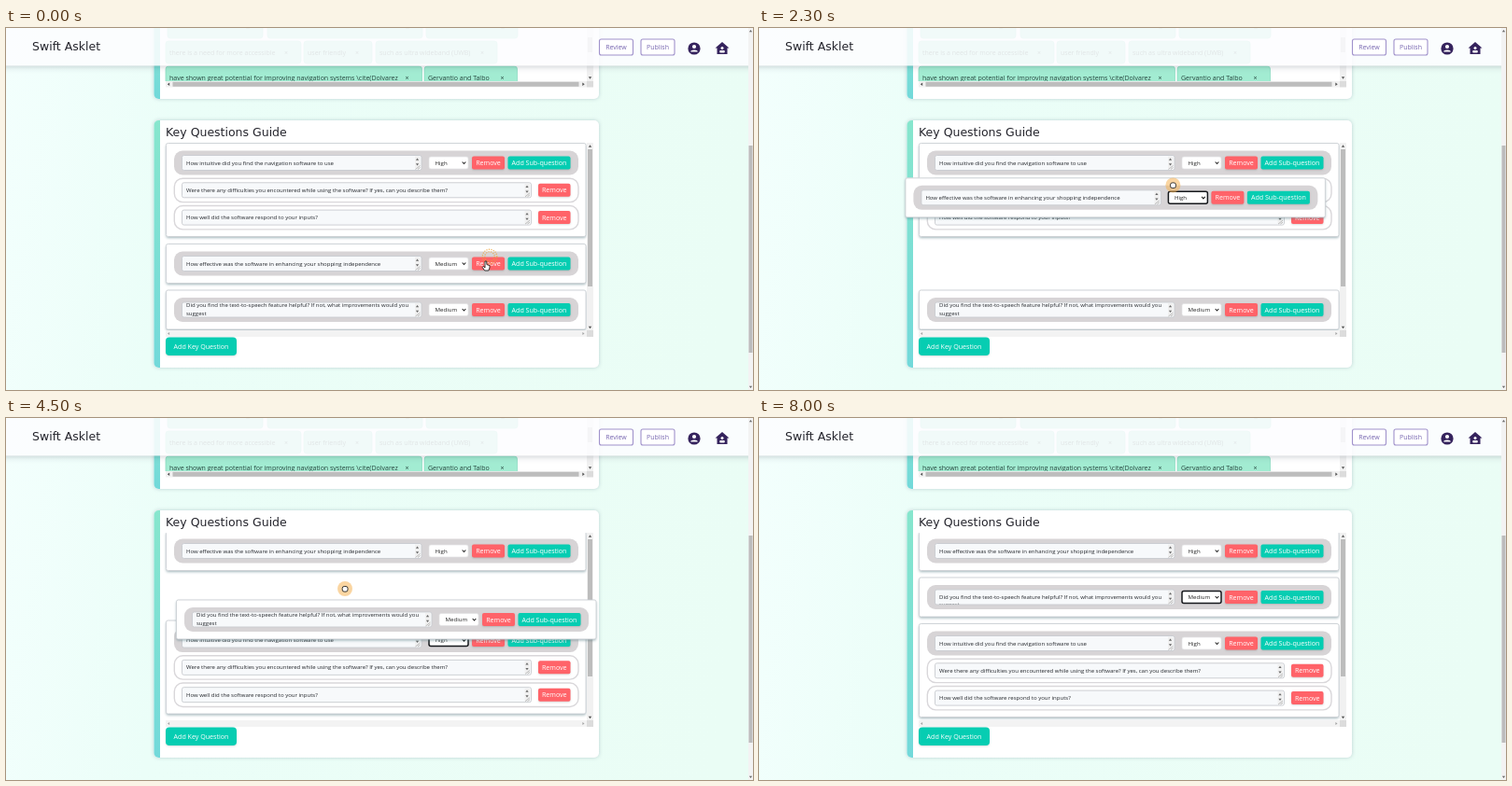
These frames come from a looping animation (800x388 px, 8.1 s). An HTML page with a canvas:

```html
<!DOCTYPE html>
<html lang="en">
<head>
<meta charset="utf-8">
<title>Key Questions Guide</title>
<style>
html, body { margin: 0; width: 100%; height: 100%; overflow: hidden; }
canvas { display: block; width: 800px; height: 388px; }
</style>
</head>
<body>
<canvas id="stage"></canvas>
<script>
const LOOP = 8100;
const SANS = '"Open Sans", "Noto Sans", sans-serif';
const WIDE = '"DejaVu Sans", sans-serif';
const RED = '#ff6369', TEAL = '#06cdb2';
const canvas = document.getElementById('stage');
const g = canvas.getContext('2d');
const dpr = window.devicePixelRatio || 1;
canvas.width = 800 * dpr;
canvas.height = 388 * dpr;

// Keys are [ms, x, y]; motion eases between neighbours.
const CURSOR = [[0, 514, 250], [600, 474, 252], [1250, 460, 253], [1600, 460, 253],
  [1900, 458, 239], [2600, 434, 123], [2900, 434, 123], [3600, 347, 285], [3900, 347, 285],
  [4500, 363, 183], [4800, 363, 181], [5500, 359, 254], [6600, 359, 254], [7150, -20, 254]];
const EFFECTIVE = [[1900, 0, 252.5], [2600, -24, 136.4], [2900, -24, 136.4], [3150, 0, 144.5],
  [4300, 0, 144.5], [4400, 0, 142.5]];
const INTUITIVE = [[2350, 0, 144.5], [2550, 0, 194], [4300, 0, 194], [4350, 0, 192], [4530, 0, 241.5]];
const SPEECH = [[3900, 0, 302], [4500, 11, 216], [4650, 15, 201], [4800, 15, 201], [5050, 0, 192]];
const PRESSES = [[1350, 1600], [1900, 2900], [3750, 4800]];
const RELEASES = [-120, 1600, 2900, 4800, 6380];

function at(keys, t) {
  if (t <= keys[0][0]) return keys[0].slice(1);
  for (let i = 1; i < keys.length; i++) {
    const [t0, x0, y0] = keys[i - 1], [t1, x1, y1] = keys[i];
    if (t < t1) {
      const u = (t - t0) / (t1 - t0), e = u * u * (3 - 2 * u);
      return [x0 + (x1 - x0) * e, y0 + (y1 - y0) * e];
    }
  }
  return keys[keys.length - 1].slice(1);
}

const within = (t, a, b) => t >= a && t < b;

function box(x, y, w, h, r, fill, stroke, line = 1) {
  g.beginPath();
  g.roundRect(x, y, w, h, r);
  if (fill) { g.fillStyle = fill; g.fill(); }
  if (stroke) { g.strokeStyle = stroke; g.lineWidth = line; g.stroke(); }
}

function shadowed(color, blur, dy, draw) {
  g.save();
  g.shadowColor = color;
  g.shadowBlur = blur * dpr;
  g.shadowOffsetY = dy * dpr;
  draw();
  g.restore();
}

function clipped(x, y, w, h, draw) {
  g.save();
  g.beginPath();
  g.rect(x, y, w, h);
  g.clip();
  draw();
  g.restore();
}

function text(s, x, y, size, color, align = 'left', family = SANS) {
  g.font = size + 'px ' + family;
  g.fillStyle = color;
  g.textAlign = align;
  g.fillText(s, x, y);
}

function disc(x, y, r, fill) {
  g.beginPath();
  g.arc(x, y, r, 0, 7);
  g.fillStyle = fill;
  g.fill();
}

function arrow(x, y, dx, dy, s, color) {
  g.beginPath();
  g.moveTo(x + dx * s, y + dy * s);
  g.lineTo(x - dx * s * .4 + dy * s, y - dy * s * .4 + dx * s);
  g.lineTo(x - dx * s * .4 - dy * s, y - dy * s * .4 - dx * s);
  g.fillStyle = color;
  g.fill();
}

function button(label, x, y, w, color) {
  shadowed('rgba(0,0,0,.15)', 2, 1, () => box(x, y - 7, w, 14, 2, color));
  text(label, x + w / 2, y + 2.6, 7.1, '#fff', 'center');
}

function field(x, y, w, lines, tops) {
  box(x, y - 8, w, 16, 2, '#f7f9fb', '#c9cbd0', .9);
  clipped(x, y - 7.5, w, 15, () =>
    lines.forEach((s, i) => text(s, x + 4.5, y + tops[i], 6.03, '#23262b')));
  const sx = x + w - 4.5;
  box(sx - 2.5, y - 7, 5.5, 14, 0, '#f0f0f0');
  arrow(sx, y - 3.5, 0, -1, 1.6, '#666');
  arrow(sx, y + 1.3, 0, 1, 1.6, '#666');
  g.beginPath();
  g.moveTo(sx - 2, y + 7); g.lineTo(sx + 3, y + 3);
  g.moveTo(sx + .5, y + 7); g.lineTo(sx + 3, y + 5);
  g.strokeStyle = '#999';
  g.lineWidth = .6;
  g.stroke();
}

function select(value, x, y, focused) {
  box(x, y - 6.5, 42, 13, 2, '#fff', focused ? '#16181c' : '#e2e2e4', focused ? 1.5 : .7);
  text(value, x + 6.5, y + 2.2, 6.1, '#222');
  g.beginPath();
  g.moveTo(x + 35.7, y - 1); g.lineTo(x + 37.5, y + 1); g.lineTo(x + 39.3, y - 1);
  g.strokeStyle = '#222';
  g.lineWidth = 1.1;
  g.stroke();
}

function card({ pos: [dx, y], lines, tops = [2.1], value, subs = [], focused }) {
  g.save();
  g.translate(dx, 0);
  const h = subs.length ? 100 : 42;
  shadowed('rgba(70,110,120,.5)', 3, 1.5, () => box(171.5, y - 21, 449.5, h, 2, '#fff'));
  box(171.5, y - 21, 449.5, h, 2, '#fff', '#cbd0d4', .9);
  box(180, y - 13, 433, 26, 9, '#d7d4d6');
  field(188.5, y, 256.5, lines, tops);
  select(value, 453, y, focused);
  button('Remove', 499, y, 35, RED);
  button('Add Sub-question', 537.5, y, 67, TEAL);
  subs.forEach((s, i) => {
    const sy = y + 29.3 * (i + 1);
    box(180.3, sy - 12.6, 432.7, 25.4, 9, '#fff', '#d9d7da', 1.4);
    field(188.5, sy, 374, [s], [2.1]);
    button('Remove', 570, sy, 34.5, RED);
  });
  g.restore();
}

function panel(y, h) {
  shadowed('rgba(60,90,110,.28)', 4, 0, () => box(158.5, y, 476.5, h, 5, '#fff'));
  clipped(158, y, 7, h, () => {
    const fill = g.createLinearGradient(0, y, 0, y + h);
    fill.addColorStop(0, '#87e6cd');
    fill.addColorStop(1, '#72d9da');
    box(158.5, y, 476.5, h, 5, fill);
  });
}

function tag(label, x, y, w) {
  box(x, y, w, 24, 3, '#a2ecd2', '#86d9bd', .7);
  text(label, x + 4, y + 15, 7, '#24453d');
  text('×', x + w - 18, y + 14.6, 7, '#24453d');
}

function background() {
  const fill = g.createLinearGradient(0, 0, 800, 120);
  fill.addColorStop(0, '#f3fffd');
  fill.addColorStop(.25, '#ebfef8');
  fill.addColorStop(1, '#eafdf5');
  box(0, 0, 800, 388, 0, fill);
}

function topPanel() {
  panel(-20, 96);
  clipped(168, -20, 454, 77, () => {
    tag('', 173, -13, 102);
    tag('', 280, -13, 166);
    tag('', 450, -13, 98);
    tag('there is a need for more accessible', 171, 14, 145);
    tag('user friendly', 319, 14, 73);
    tag('such as ultra wideband (UWB)', 396, 14, 130);
    tag('have shown great potential for improving navigation systems \\cite(Dolvarez', 171, 41, 274.5);
    tag('Gervantio and Talbo', 448, 41, 99.5);
  });
  box(622, -10, 7, 67, 0, '#f1f1f1');
  box(623, 10, 5, 16, 0, '#c1c1c1');
  arrow(625.5, 53, 0, 1, 1.7, '#555');
  box(171, 57, 451, 6.5, 0, '#f1f1f1');
  box(178.5, 57.8, 435, 5, 0, '#bdbdbd');
  box(622, 57, 7, 6.5, 0, '#dcdcdc');
  arrow(174.5, 60.3, -1, 0, 1.7, '#555');
  arrow(618, 60.3, 1, 0, 1.7, '#555');
}

function outlineButton(label, x, w) {
  box(x, 12, w, 17, 2, '#fff', '#a092cb', 1.1);
  text(label, x + w / 2, 23, 7, '#7766b0', 'center');
}

function header() {
  shadowed('rgba(40,50,70,.28)', 7, 1, () => clipped(0, 40, 795, 14, () => box(-9, 0, 820, 40, 0, '#fff')));
  box(0, 0, 795, 40.5, 0, 'rgba(253,253,255,.87)');
  text('Swift Asklet', 28, 23.5, 12.5, '#24242c', 'left', WIDE);
  outlineButton('Review', 635.5, 36);
  outlineButton('Publish', 680, 36);
  const ink = '#35235d';
  disc(737, 22, 6.6, ink);
  disc(737, 20, 2.1, '#fff');
  g.beginPath();
  g.ellipse(737, 25.6, 3.8, 2.1, 0, Math.PI, 0);
  g.fillStyle = '#fff';
  g.fill();
  g.beginPath();
  [[767, 15], [774.5, 21.5], [772.5, 21.5], [772.5, 28], [761.5, 28], [761.5, 21.5], [759.5, 21.5]]
    .forEach(p => g.lineTo(...p));
  g.fillStyle = ink;
  g.fill();
  disc(767, 21.5, 1.5, '#fff');
  box(764.2, 24, 5.6, 2.4, 1, '#fff');
}

function bars() {
  box(622, 123, 7, 201, 0, '#f1f1f1');
  box(623, 130, 5, 147, 0, '#bdbdbd');
  arrow(625.5, 127, 0, -1, 1.7, '#555');
  arrow(625.5, 320.5, 0, 1, 1.7, '#555');
  box(171, 324, 451, 7, 0, '#f3f3f3');
  box(622, 324, 7, 7, 0, '#dcdcdc');
  arrow(174.5, 327.5, -1, 0, 1.5, '#a5a5a5');
  arrow(618, 327.5, 1, 0, 1.5, '#a5a5a5');
}

function pageBar() {
  box(795, 0, 5, 388, 0, '#f3f3f3');
  box(795.5, 126, 4, 222, 0, '#bcbcbc');
  arrow(797.5, 3.5, 0, -1, 1.6, '#666');
  arrow(797.5, 384.5, 0, 1, 1.6, '#666');
}

function finger(x, y) {
  g.beginPath();
  [[-1, 0], [.7, 0], [.9, 3.6], [4, 4.6], [4, 7], [2.8, 10], [-1.4, 10], [-3.8, 6.4], [-2.8, 5.4], [-1, 7]]
    .forEach(([dx, dy]) => g.lineTo(x + dx, y + dy));
  g.closePath();
}

function fist(x, y) {
  g.beginPath();
  g.roundRect(x - 2.8, y - 2.5, 5.8, 5.6, 2);
}

function pointer(t) {
  const [x, y] = at(CURSOR, t);
  if (PRESSES.some(([a, b]) => within(t, a, b))) disc(x, y, 8, 'rgba(246,178,84,.55)');
  for (const start of RELEASES) {
    const u = (t - start) / 300;
    if (u < 0 || u >= 1) continue;
    const [rx, ry] = start < 0 ? [518, 245] : at(CURSOR, start);
    g.save();
    g.setLineDash([1.2, 1.3]);
    g.strokeStyle = `rgba(238,160,50,${1 - u * .6})`;
    g.lineWidth = 1.3;
    for (const r of [4.5, 7]) {
      g.beginPath();
      g.arc(rx, ry, r + u * 1.8, 0, 7);
      g.stroke();
    }
    g.restore();
  }
  (t < 1750 ? finger : fist)(x, y);
  g.fillStyle = '#fff';
  g.fill();
  g.strokeStyle = '#222';
  g.lineWidth = .9;
  g.stroke();
}

function draw(t) {
  g.setTransform(dpr, 0, 0, dpr, 0, 0);
  background();
  topPanel();
  header();
  panel(99, 265);
  text('Key Questions Guide', 171, 116, 12.5, '#24242c', 'left', WIDE);

  const dropped = t >= 5050;
  const cards = [
    { pos: at(INTUITIVE, t), lines: ['How intuitive did you find the navigation software to use'], value: 'High',
      subs: ['Were there any difficulties you encountered while using the software? If yes, can you describe them?',
        'How well did the software respond to your inputs?'],
      focused: within(t, 3150, 5050) },
    { pos: at(EFFECTIVE, t), lines: ['How effective was the software in enhancing your shopping independence'],
      value: t < 1300 ? 'Medium' : 'High', focused: within(t, 700, 3150), lifted: within(t, 1900, 3150) },
    { pos: at(SPEECH, t),
      lines: ['Did you find the text-to-speech feature helpful? If not, what improvements would you', 'suggest'],
      tops: dropped ? [2.1, 10.2] : [-2.9, 5.6], value: 'Medium', focused: dropped, lifted: within(t, 3900, 5050) }
  ];
  clipped(168, 123, 454, 201, () => cards.filter(c => !c.lifted).forEach(card));
  bars();
  shadowed('rgba(0,0,0,.12)', 2, 1, () => box(171, 331.5, 76, 19.5, 4, TEAL));
  text('Add Key Question', 209, 343.8, 7.1, '#fff', 'center');
  cards.filter(c => c.lifted).forEach(card);
  pageBar();
  pointer(t);
}

function tick() {
  draw(performance.now() % LOOP);
  requestAnimationFrame(tick);
}
tick();
</script>
</body>
</html>
```
